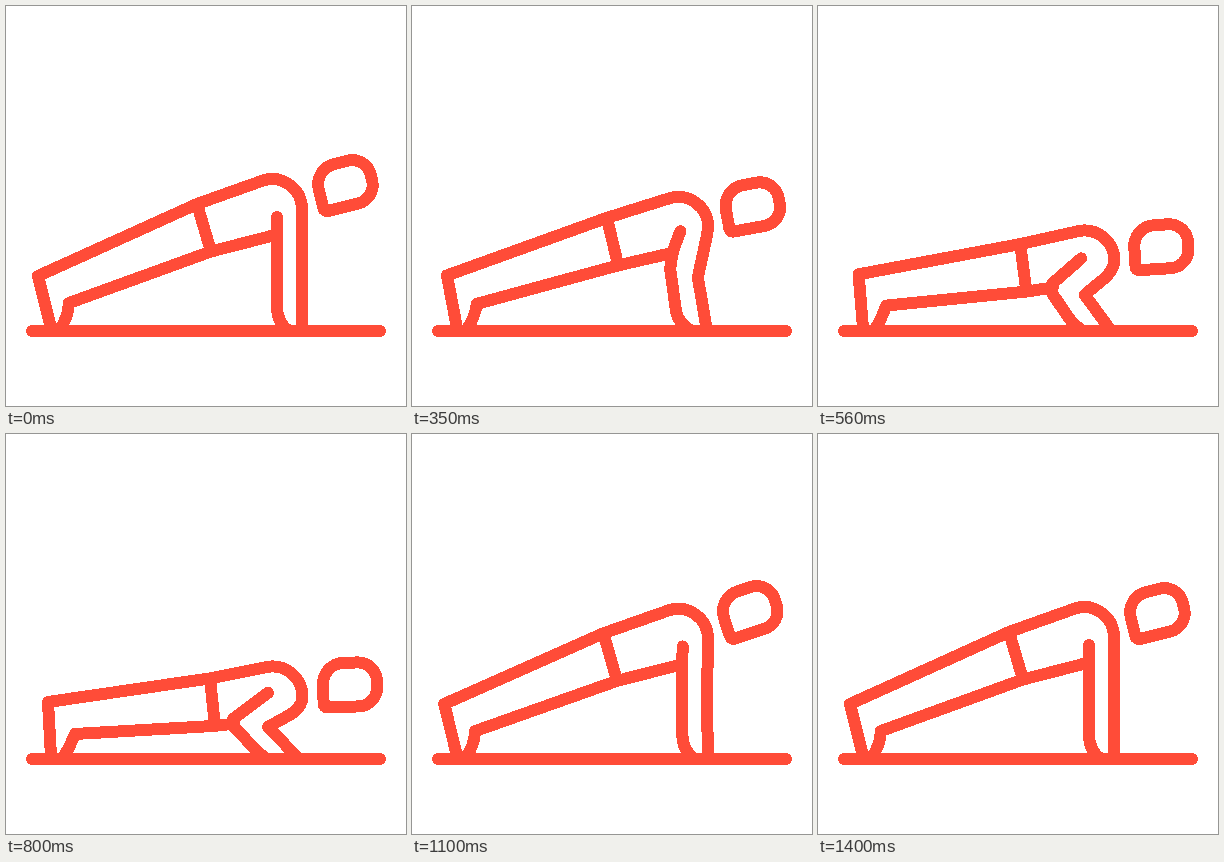
Recreate the animation shown at these times as an HTML page. Size 400 px wide and 400 px high, loop 1.43 s.

```html
<!DOCTYPE html>
<html lang="en">
<head>
<meta charset="utf-8">
<title>Push-up</title>
<style>
  html, body { margin: 0; width: 100%; height: 100%; overflow: hidden; background: #fff; }
  svg { display: block; width: 100vw; height: 100vh; }
  path {
    fill: none; stroke: #ff4c38; stroke-width: 12; stroke-linecap: round; stroke-linejoin: round;
    shape-rendering: crispEdges;
  }
</style>
</head>
<body>
<svg viewBox="0 0 400 400">
  <path id="body"/>
  <path id="head" d="M-23 22H8A19 19 0 0 0 27 3V-3A19 19 0 0 0 8-22H-6A21 21 0 0 0-27-1V18Q-27 22-23 22Z"/>
  <path d="M26 325H374"/>
</svg>
<script>
const LOOP = 1430, STEP = 30, REST = 230;
const body = document.getElementById('body');
const head = document.getElementById('head');

const clamp = x => Math.min(1, Math.max(0, x));
const mix = (a, b, k) => a + (b - a) * k;
const sine = x => (1 - Math.cos(Math.PI * clamp(x))) / 2;

function bezier(x1, y1, x2, y2) {
  const at = (a, b, s) => 3 * (1 - s) ** 2 * s * a + 3 * (1 - s) * s * s * b + s ** 3;
  return x => {
    let lo = 0, hi = 1;
    for (let i = 0; i < 24; i++) {
      const mid = (lo + hi) / 2;
      if (at(x1, x2, mid) < x) lo = mid; else hi = mid;
    }
    return at(y1, y2, lo);
  };
}

const lower = bezier(.33, .13, .5, 1);

// 0 = arms straight, 1 = chest near the floor
const depth = t => t < 788 ? lower(clamp((t - 200) / 530)) : 1 - sine((t - 788) / 350);

// Extra head tilt in degrees: lags on the way up, then overshoots
const swing = [[788, 0], [955, 10.5], [1170, -9.5], [1400, 0]];
function tilt(t) {
  for (let i = 1; i < swing.length; i++) {
    const [t0, a] = swing[i - 1], [t1, b] = swing[i];
    if (t >= t0 && t < t1) return mix(a, b, sine((t - t0) / (t1 - t0)));
  }
  return 0;
}

function draw(t) {
  const p = depth(t);
  const pt = (x0, y0, x1, y1) => [mix(x0, x1, p), mix(y0, y1, p)];

  const heel = pt(32, 270, 42, 268), hip = pt(191, 198, 204, 244.5);
  const back = pt(257, 174.5, 262, 233), shoulder = pt(296, 203, 296.5, 262);
  const bend = pt(296, 203, 296.5, 274), elbow = pt(296, 262, 262, 293);
  const under = [mix(bend[0], elbow[0], .4), mix(bend[1], elbow[1], .4)];
  const knee = pt(63, 297, 69, 300), waist = pt(205, 245.5, 209, 292);
  const armpit = pt(271, 211, 262, 259);
  const crook = [271 - 30 * p - 14 * p * p, 228.5 + 56.5 * p];
  const belly = [crook[0], crook[1] + 5 * p];
  const wrist = pt(271, 300, 247, 313);

  body.setAttribute('d', [
    'M45 322L', heel, 'L', hip, 'L', back, 'A30 30 0 0 1', shoulder,
    'Q', bend, under, 'L', elbow, 'L', pt(296, 324, 292, 324),
    'M', pt(53, 324, 57, 324), 'Q', pt(62, 313, 64, 313), knee,
    'L', waist, 'L', belly, 'M', hip, 'L', waist,
    'M', armpit, 'L', crook, 'L', pt(271, 250, 228, 293), 'L', wrist,
    'Q', pt(271, 317, 254, 320), [283 - 6 * p - 17 * p * p, 325]
  ].join(' '));

  const [x, y] = pt(339.2, 178, 344, 250.8);
  head.setAttribute('transform',
    `translate(${x} ${y}) rotate(${tilt(t)} -45 15) rotate(${mix(-14, -2, p)})`);
}

const start = performance.now();
function tick() {
  const t = (performance.now() - start) % LOOP;
  draw(t < REST ? 0 : REST + Math.floor((t - REST) / STEP) * STEP);
  requestAnimationFrame(tick);
}
tick();
</script>
</body>
</html>
```
